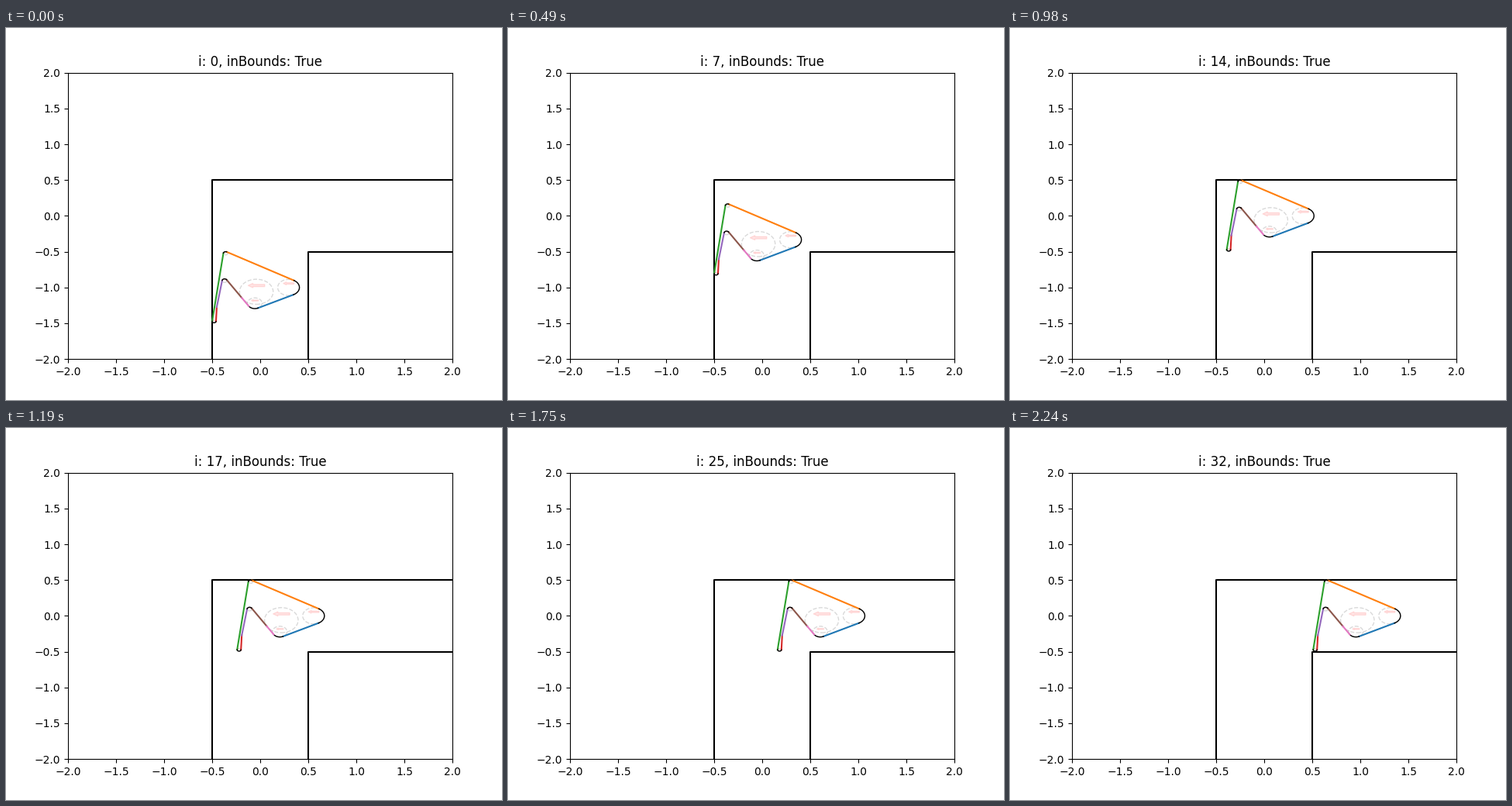
Write a matplotlib script that moves like this. It is 640 by 480 pixels and loops after 2310 ms.

```python
import numpy as np
import matplotlib.pyplot as plt
from matplotlib.animation import FuncAnimation
from matplotlib.patches import Circle, FancyArrow
from matplotlib.transforms import Affine2D

FRAMES, INTERVAL = 33, 70

# Corner circles: x, y, radius, turn (+1 left, -1 right)
CORNERS = [
    (-0.056, -1.220, 0.075, 1),
    (0.295, -1.000, 0.113, 1),
    (-0.360, -0.523, 0.023, 1),
    (-0.480, -1.473, 0.020, 1),
    (-0.452, -1.273, 0.000, -1),
    (-0.371, -0.905, 0.025, -1),
]
HUB = (-0.040, -1.060, 0.175)

fig, ax = plt.subplots(figsize=(6.4, 4.8), dpi=100)
ax.set_xlim(-2, 2)
ax.set_ylim(-2, 2)
ax.autoscale(False)
title = ax.set_title("")

shift = Affine2D()
body = shift + ax.transData


def line(points, color, width=1.5, **kw):
    ax.plot(*np.transpose(points), color=color, lw=width, **kw)


def tangent(a, b):
    """Heading and end points of the line joining two oriented circles."""
    ra, rb = a[2] * a[3], b[2] * b[3]
    dx, dy = b[0] - a[0], b[1] - a[1]
    heading = np.arctan2(dy, dx) + np.arcsin((ra - rb) / np.hypot(dx, dy))
    normal = np.array([np.sin(heading), -np.cos(heading)])
    return heading, np.array(a[:2]) + ra * normal, np.array(b[:2]) + rb * normal


def arc(corner, start, end):
    x, y, r, turn = corner
    sweep = turn * ((turn * (end - start)) % (2 * np.pi))
    t = start + np.linspace(0, sweep, 40)
    pts = np.column_stack([x + turn * r * np.sin(t), y - turn * r * np.cos(t)])
    line(pts, "black", 1, transform=body)


def guide(x, y, r):
    """Faint dashed circle with a small arrow pointing left."""
    ring = Circle((x, y), r, fill=False, ec="black", ls="--", lw=1, alpha=0.15)
    arrow = FancyArrow(x + r / 2, y + r / 2, -r, 0, width=0.18 * r,
                       head_width=0.36 * r, head_length=0.3 * r,
                       length_includes_head=True, color="red", alpha=0.1)
    for patch in (ring, arrow):
        patch.set_transform(body)
        ax.add_artist(patch)


line([(-0.5, -2), (-0.5, 0.5), (2, 0.5)], "black")
line([(0.5, -2), (0.5, -0.5), (2, -0.5)], "black")

for x, y, r in [HUB] + [c[:3] for c in CORNERS if c[2] > 0]:
    guide(x, y, r)

sides = [tangent(c, CORNERS[(k + 1) % len(CORNERS)]) for k, c in enumerate(CORNERS)]
for k, (heading, p, q) in enumerate(sides):
    if k < len(sides) - 1:
        line([p, q], f"C{k}", transform=body)
    else:
        mid = p + 0.69 * (q - p)
        line([p, mid], "C5", transform=body)
        line([mid, q], "C6", transform=body)
    if CORNERS[k][2] > 0:
        arc(CORNERS[k], sides[k - 1][0], heading)


def update(i):
    up = min(1.0, i * 2 / 21)
    right = max(0.0, 0.05 * (i - 11.8))
    shift.clear().translate(right, up)
    title.set_text(f"i: {i}, inBounds: True")
    return []


anim = FuncAnimation(fig, update, frames=FRAMES, interval=INTERVAL,
                     repeat=True, repeat_delay=0, blit=False)
plt.show()
```
